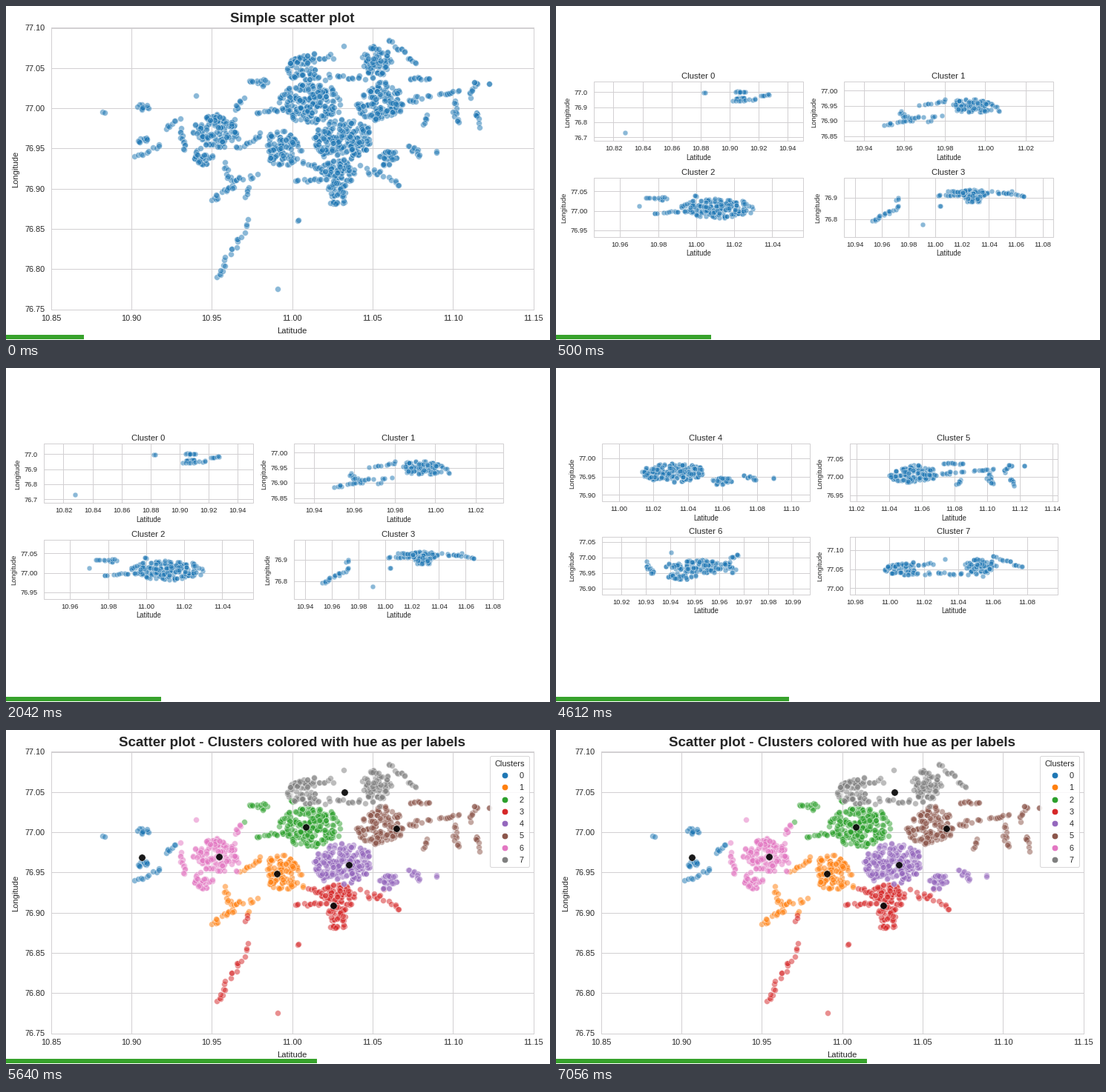
Recreate the animation shown at these times as a matplotlib script. Size 733x451 px, loop 8 s.

```python
import numpy as np
import matplotlib.pyplot as plt
from matplotlib.animation import FuncAnimation
from matplotlib.patches import FancyBboxPatch, Rectangle

W, H, DPI = 733, 451, 64
STEP_MS, LOOP_MS = 20, 8000
STARTS_MS = (0, 500, 3060, 5640)
PT = 72 / DPI
INK, GRID, BAR = "#262626", "#d2d0d2", "#37a22c"
COLORS = ("#1f77b4", "#ff7f0e", "#2ca02c", "#d62728",
          "#9467bd", "#8c564b", "#e377c2", "#7f7f7f")

plt.rcParams["font.family"] = "Liberation Sans"
rng = np.random.default_rng(11)

# Boxes are (left, top, right, bottom); limits are (x0, x1, y0, y1) in degrees.
MAIN_BOX = (61, 29, 711, 409)
MAIN_LIMITS = (10.85, 11.15, 76.75, 77.10)

# All places below are given on the main chart's pixels.
CENTERS = np.array([(183, 171), (365, 193), (404, 130), (441, 236),
                    (462, 181), (526, 132), (287, 170), (456, 83)], float)
# Towns: centre and radii of an ellipse.
TOWNS = ((455, 180, 40, 28), (373, 191, 24, 25), (410, 130, 42, 26),
         (285, 168, 33, 22), (267, 203, 13, 12), (448, 224, 24, 17),
         (446, 252, 15, 16), (503, 128, 32, 26), (400, 85, 21, 19),
         (500, 75, 20, 22), (515, 203, 13, 12), (340, 104, 13, 6),
         (183, 136, 10, 6), (183, 181, 9, 6))
# Roads: both ends of a line of places.
ROADS = ((278, 264, 302, 243), (295, 214, 305, 246), (302, 234, 336, 229),
         (338, 143, 372, 138), (308, 140, 320, 124), (286, 366, 328, 287),
         (322, 255, 329, 247), (392, 235, 430, 233), (402, 210, 430, 222),
         (480, 215, 528, 239), (397, 67, 442, 68), (418, 95, 482, 96),
         (515, 46, 553, 76), (528, 132, 570, 121), (545, 98, 569, 97),
         (566, 148, 566, 160), (587, 118, 608, 115), (605, 128, 609, 157),
         (624, 122, 634, 103), (635, 143, 637, 160), (545, 190, 558, 201),
         (173, 203, 207, 191), (214, 164, 232, 154), (237, 165, 239, 191),
         (312, 191, 345, 174))
STRAYS = ((13, 431), (132, 143), (256, 120), (365, 384), (394, 288),
          (456, 55), (581, 196), (651, 105))


def town(x, y, rx, ry):
    n = int(0.14 * rx * ry)
    r, a = np.sqrt(rng.random(n)), rng.random(n) * 2 * np.pi
    return np.column_stack((x + rx * r * np.cos(a), y + ry * r * np.sin(a)))


def road(x0, y0, x1, y1):
    t = np.linspace(0, 1, 4 + int(np.hypot(x1 - x0, y1 - y0) / 7))[:, None]
    line = (1 - t) * (x0, y0) + t * (x1, y1)
    return line + rng.normal(0, 1.6, line.shape)


def to_px(points, box, limits):
    left, top, right, bottom = box
    x0, x1, y0, y1 = limits
    return (left + (points[:, 0] - x0) / (x1 - x0) * (right - left),
            bottom - (points[:, 1] - y0) / (y1 - y0) * (bottom - top))


def to_degrees(points):
    left, top, right, bottom = MAIN_BOX
    x0, x1, y0, y1 = MAIN_LIMITS
    return np.column_stack(
        (x0 + (points[:, 0] - left) / (right - left) * (x1 - x0),
         y0 + (bottom - points[:, 1]) / (bottom - top) * (y1 - y0)))


def make_clusters():
    """Give every place to its nearest centre, measured in degrees."""
    places = np.vstack([town(*t) for t in TOWNS] + [road(*r) for r in ROADS]
                       + [np.array(STRAYS, float)])
    places = np.repeat(places, rng.integers(1, 3, len(places)), axis=0)
    places = to_degrees(places + rng.normal(0, 0.8, places.shape))
    gaps = places[:, None] - to_degrees(CENTERS)[None]
    nearest = np.hypot(gaps[..., 0], gaps[..., 1]).argmin(axis=1)
    return [places[nearest == k] for k in range(len(CENTERS))]


clusters = make_clusters()


def label(ax, x, y, text, size, **style):
    """Text whose capitals are centred on y."""
    style = {"ha": "center", "color": INK, **style}
    ax.text(x, y + 0.36 * size, text, size=size * PT, va="baseline", **style)


def dots(ax, points, box, limits, color, size):
    x, y = to_px(points, box, limits)
    inside = x > box[0]
    ax.plot(x[inside], y[inside], "o", ms=size * PT, mfc=color, mec="white",
            mew=0.65 * PT, alpha=0.52, zorder=3)


def ticks(low, high, step):
    first, last = np.ceil(low / step - 1e-6), np.floor(high / step + 1e-6)
    return np.arange(first, last + 1) * step


def panel(ax, box, limits, steps, size, gaps):
    """Frame, grid, tick labels and axis names."""
    left, top, right, bottom = box
    digits = 1 if steps[1] == 0.1 else 2
    xs, ys = ticks(*limits[:2], steps[0]), ticks(*limits[2:], steps[1])
    px = to_px(np.column_stack((xs, xs)), box, limits)[0]
    py = to_px(np.column_stack((ys, ys)), box, limits)[1]
    for x, value in zip(px, xs):
        ax.plot((x, x), (top, bottom), color=GRID, lw=PT, zorder=1)
        label(ax, x, bottom + gaps[0], f"{value:.2f}", size)
    for y, value in zip(py, ys):
        ax.plot((left, right), (y, y), color=GRID, lw=PT, zorder=1)
        label(ax, left - 7.5, y, f"{value:.{digits}f}", size, ha="right")
    ax.add_patch(Rectangle((left, top), right - left, bottom - top, fill=False,
                           ec=GRID, lw=PT, zorder=2))
    label(ax, (left + right) / 2, bottom + gaps[1], "Latitude", size + 0.3)
    ax.text(left - gaps[2] - 5 * digits, (top + bottom) / 2 + 1, "Longitude",
            size=(size + 0.2) * PT, rotation=90, ha="center", va="center",
            color=INK)


def main_chart(ax, title, colors):
    panel(ax, MAIN_BOX, MAIN_LIMITS, (0.05, 0.05), 10.9, (12, 28, 37.5))
    label(ax, 386, 15, title, 18.7, weight="bold")
    for points, color in zip(clusters, colors):
        dots(ax, points, MAIN_BOX, MAIN_LIMITS, color, 7.8)


def simple(ax):
    main_chart(ax, "Simple scatter plot", COLORS[:1] * len(clusters))


def colored(ax):
    main_chart(ax, "Scatter plot - Clusters colored with hue as per labels",
               COLORS)
    ax.plot(*CENTERS.T, "o", ms=9.4 * PT, mfc="black", mec="white",
            mew=0.5 * PT, alpha=0.9, zorder=4)
    ax.add_patch(FancyBboxPatch((653, 35), 53, 150, fc="white", ec=GRID, lw=PT,
                                alpha=0.85, zorder=5,
                                boxstyle="round,pad=0,rounding_size=2"))
    label(ax, 679.5, 44.5, "Clusters", 11, zorder=6)
    for i, color in enumerate(COLORS):
        y = 60.5 + 16.3 * i
        ax.plot(672, y, "o", ms=8.4 * PT, mfc=color, mec="white", mew=0.5 * PT,
                zorder=6)
        label(ax, 695, y, str(i), 10.9, zorder=6)


def tick_step(span, pixels, steps, room):
    return next(s for s in steps if s / span * pixels >= room)


def small_chart(ax, k, box, limits):
    left, top, right, bottom = box
    x0, x1, y0, y1 = limits
    steps = (tick_step(x1 - x0, right - left, (0.01, 0.02), 30),
             tick_step(y1 - y0, bottom - top, (0.05, 0.1), 20))
    panel(ax, box, limits, steps, 9.2, (9.7, 21.9, 29.5))
    label(ax, (left + right) / 2, top - 8, f"Cluster {k}", 11.2)
    dots(ax, clusters[k], box, limits, COLORS[0], 6.8)


def four_charts(first, lefts, tops, size, limits):
    """Slide with a two by two grid of cluster charts."""
    def draw(ax):
        for i, lim in enumerate(limits):
            left, top = lefts[i % 2], tops[i // 2]
            box = (left, top, left + size[0], top + size[1])
            small_chart(ax, first + i, box, lim)
    return draw


first_four = four_charts(0, (51, 388), (101.4, 231), (282.5, 80.3), (
    (10.8062, 10.9506, 76.676, 77.071), (10.9301, 11.0336, 76.834, 77.030),
    (10.9460, 11.0563, 76.933, 77.086), (10.9317, 11.0880, 76.717, 76.993)))
last_four = four_charts(4, (62, 396), (101.4, 227), (280.5, 78.5), (
    (10.9901, 11.1107, 76.882, 77.040), (11.0159, 11.1432, 76.932, 77.092),
    (10.9120, 10.9971, 76.880, 77.068), (10.9768, 11.0977, 76.983, 77.136)))

fig = plt.figure(figsize=(W / DPI, H / DPI), dpi=DPI, facecolor="white")


def render(draw, part):
    """Draw one slide with its progress bar and keep the pixels."""
    ax = fig.add_axes((0, 0, 1, 1))
    ax.set(xlim=(0.5, W + 0.5), ylim=(H - 0.5, -0.5), autoscale_on=False)
    ax.axis("off")
    draw(ax)
    ax.add_patch(Rectangle((0.5, 443.5), round(W * part), 6, fc=BAR, lw=0))
    fig.canvas.draw()
    pixels = np.array(fig.canvas.buffer_rgba())
    ax.remove()
    return pixels


slides = [render(draw, (i + 1) / 7)
          for i, draw in enumerate((simple, first_four, last_four, colored))]
picture = fig.figimage(slides[0])


def update(frame):
    t = frame * STEP_MS
    picture.set_data(slides[sum(t >= start for start in STARTS_MS) - 1])
    return (picture,)


anim = FuncAnimation(fig, update, frames=LOOP_MS // STEP_MS, interval=STEP_MS,
                     repeat=True, repeat_delay=0)
plt.show()
```
